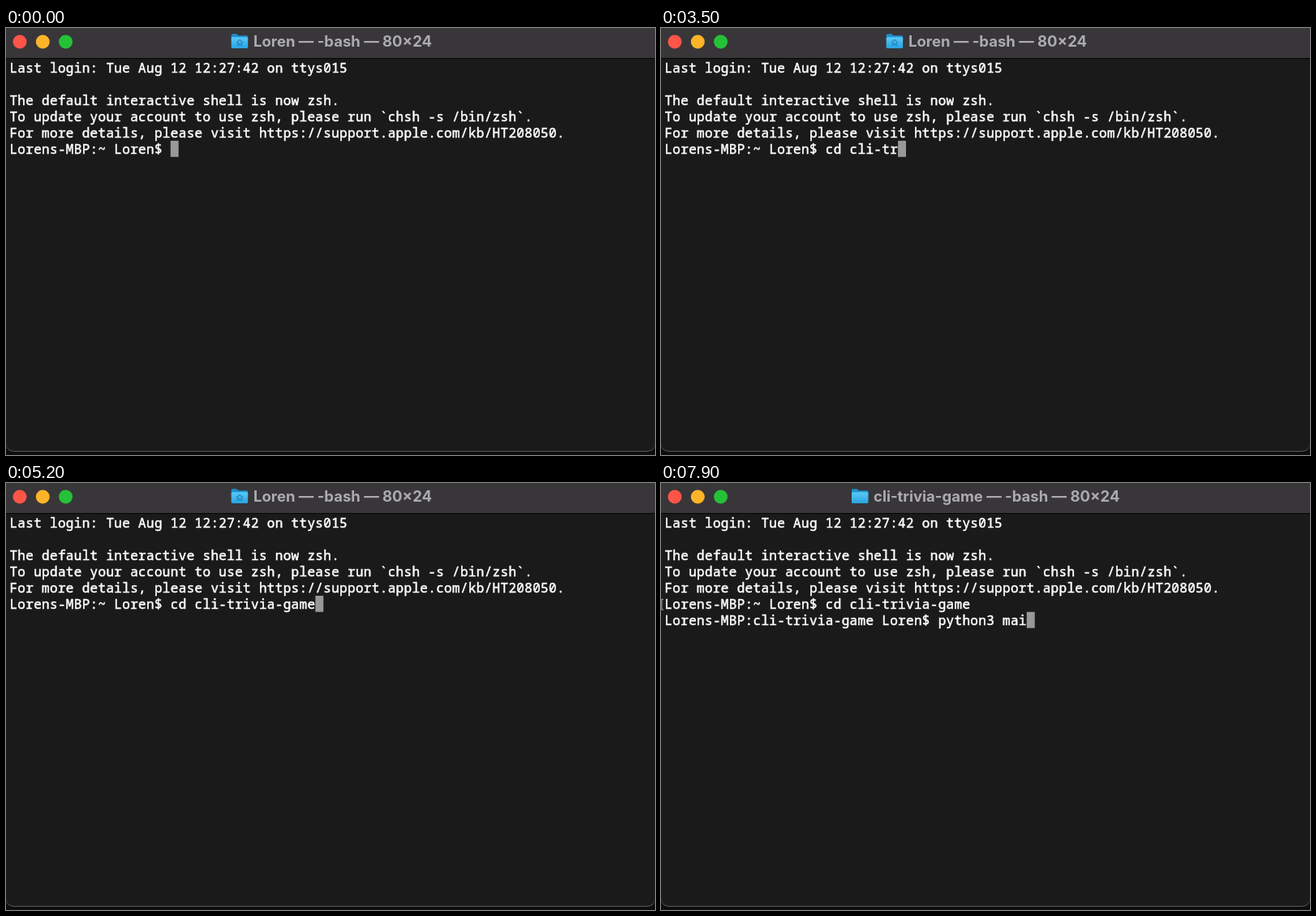
These frames come from a looping animation (800 by 526 pixels, 8 s). An HTML page:

```html
<!DOCTYPE html>
<html lang="en">
<head>
<meta charset="utf-8">
<title>Terminal</title>
<style>
  html, body { margin: 0; width: 100%; height: 100%; overflow: hidden; background: #0d0d0d; }
  svg { display: block; width: 800px; height: 526px; }
  .term text {
    font: 500 16px "Noto Sans Mono", "DejaVu Sans Mono", monospace;
    letter-spacing: .32px;
    white-space: pre;
    fill: #fff;
    stroke: #fff;
    stroke-width: .5px;
  }
  #title { font: 700 18.5px Inter, "Open Sans", sans-serif; fill: #acabad; }
</style>
</head>
<body>
<svg viewBox="0 0 800 526">
  <defs>
    <linearGradient id="blue" x2="0" y2="1">
      <stop offset="0" stop-color="#5ac8f7"/>
      <stop offset="1" stop-color="#2ba3e2"/>
    </linearGradient>
  </defs>

  <path d="M0 0H800V511Q800 522 789 522H11Q0 522 0 511Z" fill="#5a5a5a"/>
  <path d="M0 0H800V510Q800 521 789 521H11Q0 521 0 510Z" fill="#1a1a1a"/>
  <rect width="800" height="37" fill="#383639"/>
  <rect y="37" width="800" height="1" fill="#050505"/>

  <circle cx="17" cy="17" r="8.5" fill="#fe5549"/>
  <circle cx="45.3" cy="17" r="8.5" fill="#feb429"/>
  <circle cx="73.6" cy="17" r="8.5" fill="#25c138"/>

  <g id="folder">
    <path d="M0 2Q0 .3 1.7 .3H6.5L8.7 2.3H19Q20.5 2.3 20.5 4V8H0Z" fill="#1d8fcb"/>
    <rect y="4.3" width="20.5" height="13.7" rx="1.6" fill="url(#blue)"/>
    <path id="house" d="M6.3 10.9L10.3 7.5L14.3 10.9M7.6 10.4V14.2H9.4V12H11.2V14.2H13V10.4" fill="none" stroke="#1f86bf" stroke-width="1.1"/>
  </g>
  <text id="title" y="23"></text>

  <g id="term" class="term">
    <rect id="cursor" width="9.92" height="19.9" fill="#989898"/>
    <path id="mark" d="M3 143.5H.8V156H3" fill="none" stroke="#8a8a8a" stroke-width="1.3"/>
  </g>
</svg>
<script>
  const LOOP = 8000, ENTER = 5300, RETITLE = 5400;
  const LEFT = 4.4, CHAR = 9.92, TOP = 39.4, LINE = 19.9;
  const $ = id => document.getElementById(id);

  const first = {
    row: 5, prompt: "Lorens-MBP:~ Loren$ ", keys: "cd cli-trivia-game",
    times: [600, 900, 1500, 2200, 2400, 2600, 2900, 3200, 3400,
            3600, 3700, 4000, 4200, 4400, 4600, 4700, 4900, 5100]
  };
  const second = {
    row: 6, prompt: "Lorens-MBP:cli-trivia-game Loren$ ", keys: "python3 main.py",
    times: [6400, 6500, 6700, 6800, 7000, 7100, 7300, 7500, 7700, 7800, 7900]
  };

  function addLine(row, text = "") {
    const el = document.createElementNS("http://www.w3.org/2000/svg", "text");
    el.setAttribute("x", LEFT);
    el.setAttribute("y", Math.round(TOP + row * LINE + 15.8));
    el.textContent = text;
    $("term").append(el);
    return el;
  }

  [
    "Last login: Tue Aug 12 12:27:42 on ttys015",
    "",
    "The default interactive shell is now zsh.",
    "To update your account to use zsh, please run `chsh -s /bin/zsh`.",
    "For more details, please visit https://support.apple.com/kb/HT208050."
  ].forEach((text, row) => addLine(row, text));
  for (const cmd of [first, second]) cmd.el = addLine(cmd.row);

  const typed = (cmd, t) =>
    cmd.prompt + cmd.keys.slice(0, cmd.times.filter(at => at <= t).length);

  function setTitle(moved) {
    $("title").textContent = (moved ? "cli-trivia-game" : "Loren") + " — -bash — 80×24";
    $("title").setAttribute("x", moved ? 262 : 305);
    $("folder").setAttribute("transform", `translate(${moved ? 235 : 277.7} 7)`);
    $("house").setAttribute("visibility", moved ? "hidden" : "visible");
  }

  function draw(now) {
    const t = now % LOOP, entered = t >= ENTER;
    const active = entered ? second : first;
    first.el.textContent = typed(first, t);
    second.el.textContent = entered ? typed(second, t) : "";
    $("cursor").setAttribute("x", LEFT + active.el.textContent.length * CHAR);
    $("cursor").setAttribute("y", TOP + active.row * LINE);
    $("mark").setAttribute("visibility", entered ? "visible" : "hidden");
    setTitle(t >= RETITLE);
  }

  const start = performance.now();
  function tick() {
    draw(performance.now() - start);
    requestAnimationFrame(tick);
  }
  tick();
</script>
</body>
</html>
```
